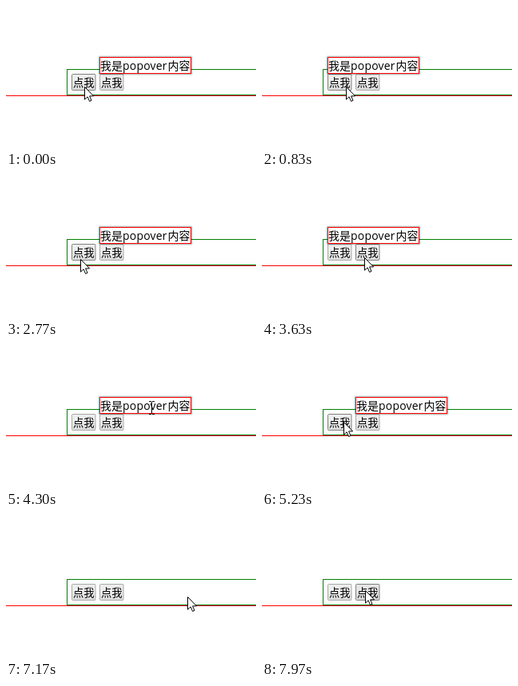
Recreate the animation shown at these times as an HTML page. Size 313 by 178 pixels, loop 8 s.

```html
<!DOCTYPE html>
<html lang="zh-CN">
<head>
<meta charset="utf-8">
<title>Popover</title>
<style>
  html, body { margin: 0; width: 100%; height: 100%; overflow: hidden; background: #fff; }
  svg { display: block; width: 100%; height: 100%; }
  text { font-family: "Open Sans", "Noto Sans CJK SC", "Noto Sans CJK", sans-serif; font-weight: 300; fill: #000; }
  .latin { font-weight: 400; letter-spacing: .2px; }
  .crisp { shape-rendering: crispEdges; }
</style>
</head>
<body>
<svg viewBox="0 0 313 178">
  <defs>
    <linearGradient id="idle" x2="0" y2="1"><stop offset=".35" stop-color="#ededed"/><stop offset="1" stop-color="#dedede"/></linearGradient>
    <linearGradient id="down" x2="0" y2="1"><stop offset=".35" stop-color="#e5e5e5"/><stop offset="1" stop-color="#d7d7d7"/></linearGradient>
  </defs>
  <g class="crisp" fill="none">
    <path d="M314 79.5H76.5V111.5H314" stroke="#008000"/>
    <path d="M0 112.5H313" stroke="#f00"/>
  </g>
  <g id="buttons"></g>
  <g id="popover">
    <g fill="none" stroke="#000">
      <rect x="-.5" y="63.5" width="116" height="22" rx="1" stroke-opacity=".25"/>
      <rect x="-1.5" y="62.5" width="118" height="24" rx="2" stroke-opacity=".1"/>
    </g>
    <rect class="crisp" x=".5" y="64.5" width="114" height="20" fill="#fff" stroke="#f00"/>
    <text y="80" font-size="14">
      <tspan x="1">我是</tspan><tspan class="latin" x="29">popover</tspan><tspan x="85.5">内容</tspan>
    </text>
  </g>
  <path id="arrow" d="M.5 .5V16.2L4.1 12.8 6.6 18.5 9 17.4 6.6 11.9H11.6Z" fill="#fff" stroke="#000"/>
  <path id="beam" class="crisp" d="M-3 -7.5H0M1 -7.5H4M.5 -7V8M-3 8.5H0M1 8.5H4" fill="none" stroke="#000"/>
</svg>
<script>
const LOOP = 8000, STEP = 200 / 3, OFFSET = 100 / 3, HOLD = 200;
const $ = id => document.getElementById(id);

// Each move: start, end, x, y
const origin = [98, 101];
const moves = [
  [700, 1033, 118, 102],
  [1233, 1633, 129, 102],
  [2300, 2767, 93, 104],
  [3167, 3633, 128, 102],
  [4100, 4300, 182, 77],
  [4767, 5233, 102, 95],
  [5700, 6167, 112, 79],
  [6433, 7033, 227, 101],
  [7167, 7433, 143, 99],
  [7500, 7833, 129, 93]
];

// Moments the mouse button is released
const clicks = [500, 2167, 3033, 4033, 5567, 7167, 8167];

const buttons = [82, 117].map(x => {
  $("buttons").insertAdjacentHTML("beforeend",
    `<g transform="translate(${x} 85)"><rect x=".5" y=".5" width="29.5" height="20" rx="1"/>` +
    `<text x="15.3" y="16" font-size="13.33" text-anchor="middle">点我</text></g>`);
  return { x, rect: $("buttons").lastElementChild.firstElementChild };
});

const ease = k => k * k * (3 - 2 * k);
const inside = ([x, y], left, top, w, h) => x >= left && x < left + w && y >= top && y < top + h;
const isOver = (button, point) => inside(point, button.x, 85, 31, 21);
const show = (el, on) => el.setAttribute("visibility", on ? "visible" : "hidden");
const move = (el, x, y) => el.setAttribute("transform", `translate(${x} ${y})`);

function pointer(t) {
  let [x, y] = origin;
  for (const [from, to, nx, ny] of moves) {
    const k = ease(Math.min(1, Math.max(0, (t - from) / (to - from))));
    x += (nx - x) * k;
    y += (ny - y) * k;
  }
  return [Math.round(x), Math.round(y)];
}

// A clicked button opens its popover; a click elsewhere closes it
function openButton(t) {
  const last = clicks.filter(c => c <= t).pop();
  return last === undefined ? buttons[1] : buttons.find(b => isOver(b, pointer(last)));
}

function draw(time) {
  // Motion advances at 15 steps per second
  const t = Math.max(0, Math.floor((time - OFFSET + 4) / STEP) * STEP + OFFSET + 1);
  const point = pointer(t);
  const open = openButton(t);
  const held = clicks.some(c => t >= c - HOLD && t < c);

  show($("popover"), open);
  if (open) move($("popover"), open.x, 0);

  for (const b of buttons) {
    const over = isOver(b, point);
    b.rect.setAttribute("fill", `url(#${over && held ? "down" : "idle"})`);
    b.rect.setAttribute("stroke", over ? "#808080" : "#a8a8a8");
  }

  const onText = open && inside(point, open.x, 64, 115, 21);
  show($("beam"), onText);
  show($("arrow"), !onText);
  move($(onText ? "beam" : "arrow"), ...point);
}

const start = performance.now();
function tick() {
  draw((performance.now() - start) % LOOP);
  requestAnimationFrame(tick);
}
tick();
</script>
</body>
</html>
```
